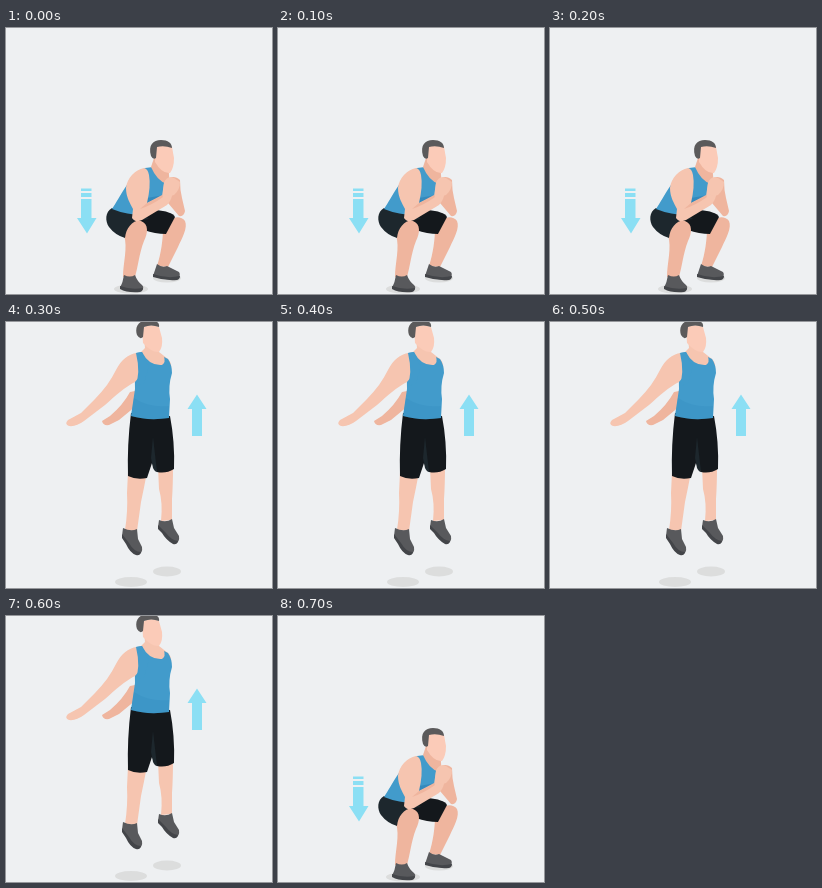
An HTML page for the animation above (800 ms loop, 266 by 266 pixels).

```html
<!DOCTYPE html>
<html lang="en">
<head>
<meta charset="utf-8">
<title>Jump squat</title>
<style>
  html, body { margin: 0; height: 100%; overflow: hidden; background: #eef0f2; }
  svg { display: block; width: 100vw; height: 100vh; }
  .skin { fill: #f6c5b0; }
  .shade { fill: #efb59e; }
  .face { fill: #fbcbb8; }
  .hair { fill: #5b5a5b; }
  .top { fill: #429bcb; }
  .fold { fill: #348abd; }
  .shorts { fill: #14181c; }
  .dark { fill: #1d272d; }
  .shoe { fill: #58595c; }
  .sole { fill: #434549; }
  .shadow { fill: #dcdddd; }
  .arrow { fill: #8bdff4; }
</style>
</head>
<body>
<svg viewBox="0 0 266 266">
  <g id="squat">
    <path class="arrow" d="M75 160.5H85.5V163H75ZM75 165H85.5V169H75ZM75 171H85.5V190H90.5L81 205.5 71 190H75Z"/>
    <ellipse class="shadow" cx="125" cy="261" rx="17" ry="4.5"/>
    <ellipse class="shadow" cx="161" cy="250" rx="14" ry="4.5"/>

    <path class="shade" d="M161 152C164 148 170 148 174 152Q174 162 176 170L179 183Q178 189 173 188L162 175Z"/>
    <path class="shade" d="M157 200C162 189 174 186 179 193C182 200 176 210 172 219L162 239 151 238C155 226 157 211 157 200Z"/>
    <path class="shorts" d="M124 185L150 182C160 183 167 185 169 189L160 206Q149 206 138 202Z"/>
    <path class="shoe" d="M151 236Q156 240 161 238L173 244Q175 247 172 251Q162 253 147 248Z"/>
    <path class="sole" d="M147 246Q161 251 174 248Q174 251 171 252Q159 253 147 249Z"/>

    <path class="shade" d="M118 207C119 196 127 191 135 193C143 196 142 205 138 213C133 226 132 239 129 249H117C117 235 122 220 118 207Z"/>
    <path class="dark" d="M106 180C99 184 99 193 103 199Q109 207 119 210C120 200 126 193 134 192L143 191 134 184Z"/>
    <path class="shoe" d="M118 247Q124 250 129 247Q131 253 136 257Q139 260 135 263Q123 265 114 260Q117 254 118 247Z"/>
    <path class="sole" d="M114 258Q125 262 137 260Q137 263 134 264Q121 265 114 261Z"/>

    <path class="top" d="M139 140L147 139Q153 148 160 153L159 172Q150 181 143 187Q123 188 106 181C115 168 121 151 139 140Z"/>
    <path class="fold" d="M141 170L158 167Q150 180 143 187L130 186Z"/>
    <path class="shade" d="M145 139L148 130H162L163 147Q164 153 161 156Q151 153 145 139Z"/>
    <path class="face" d="M149 118Q158 114 166 119L168 130Q168 140 164 145Q156 146 149 134Z"/>
    <path class="hair" d="M145 128C142 117 147 112 155 112C162 112 166 115 166 120Q158 117 151 119L150 130Q147 132 145 128Z"/>
    <path class="skin" d="M138 140C129 142 121 150 120 160C120 169 124 175 127 181L126 190Q129 195 136 192L161 177C166 172 168 164 166 155Q161 148 158 155L156 168 141 175Q145 158 143 147Q142 141 138 140Z"/>
    <path class="shade" d="M141 175L134 181Q146 177 157 169L156 167Z"/>
    <path class="skin" d="M158 155Q161 147 168 150L174 154Q174 162 168 167Q161 169 157 164Z"/>
  </g>

  <g id="jump">
    <path class="arrow" d="M191 72.5L200.5 87H196V114H186V87H181.5Z"/>
    <ellipse class="shadow" cx="125" cy="260" rx="16" ry="5"/>
    <ellipse class="shadow" cx="161" cy="249.5" rx="14" ry="5"/>

    <path class="shade" d="M129 69L130 84 113 98 103 103Q97 104 96 99L104 94Q117 83 124 70Z"/>
    <path class="skin" d="M152 145L167 144Q167 163 166 177L166 198 155 199Q157 181 153 167Z"/>
    <path class="skin" d="M122 150H141Q138 166 135 180L131 209 119 208Q122 189 121 171Z"/>
    <path class="shoe" d="M153 198Q160 201 166 197L168 206 173 214Q174 220 169 222Q162 218 158 211L152 205Z"/>
    <path class="sole" d="M152 203L160 211Q165 218 172 219Q171 223 167 222Q160 218 156 211L152 207Z"/>
    <path class="shoe" d="M117 206Q125 210 131 207L132 217 136 225Q137 231 132 233Q125 231 121 222L116 214Z"/>
    <path class="sole" d="M116 212L123 221Q128 230 135 230Q134 234 130 233Q124 231 120 222L116 216Z"/>

    <path class="shorts" d="M125 91L164 94Q169 120 168 147Q160 152 151 150L146 141 141 156Q130 158 122 154Q121 123 125 91Z"/>
    <path class="dark" d="M147 115L151 150Q149 150 147 146L145 136Z"/>

    <path class="skin" d="M133 32L139 26 138 16H153V30L162 37Q166 40 165 49L147 49 132 40Z"/>
    <path class="top" d="M130 31L136 30Q143 44 156 43Q160 40 158 35L162 37Q166 43 166 51Q162 64 164 77L163 96Q142 99 125 94L129 67Q129 48 127 36Z"/>
    <path class="fold" d="M128 76Q143 86 163 84L163 96Q142 99 125 94Z" opacity=".3"/>
    <path class="skin" d="M131 31C122 32 115 38 110 48C105 58 98 68 89 77L75 91 62 98Q58 102 63 104Q70 105 78 99L99 83C109 74 119 65 129 60Q137 53 134 39Z"/>
    <path class="top" d="M130 31L136 30Q139 40 143 44L138 61 129 65Q135 52 130 31Z"/>

    <path class="face" d="M136 6Q144 1 153 5L156 16Q157 25 153 30Q146 31 137 21Z"/>
    <path class="hair" d="M131 13C128 4 134-2 142-2C149-2 154 0 153 5Q145 2 138 5L137 15Q134 18 131 13Z"/>
  </g>
</svg>
<script>
  const squat = document.getElementById("squat");
  const jump = document.getElementById("jump");

  function draw(now) {
    const t = now % 800;
    const up = t >= 300 && t < 700;
    squat.style.display = up ? "none" : "";
    jump.style.display = up ? "" : "none";
    requestAnimationFrame(draw);
  }
  draw(performance.now());
</script>
</body>
</html>
```
